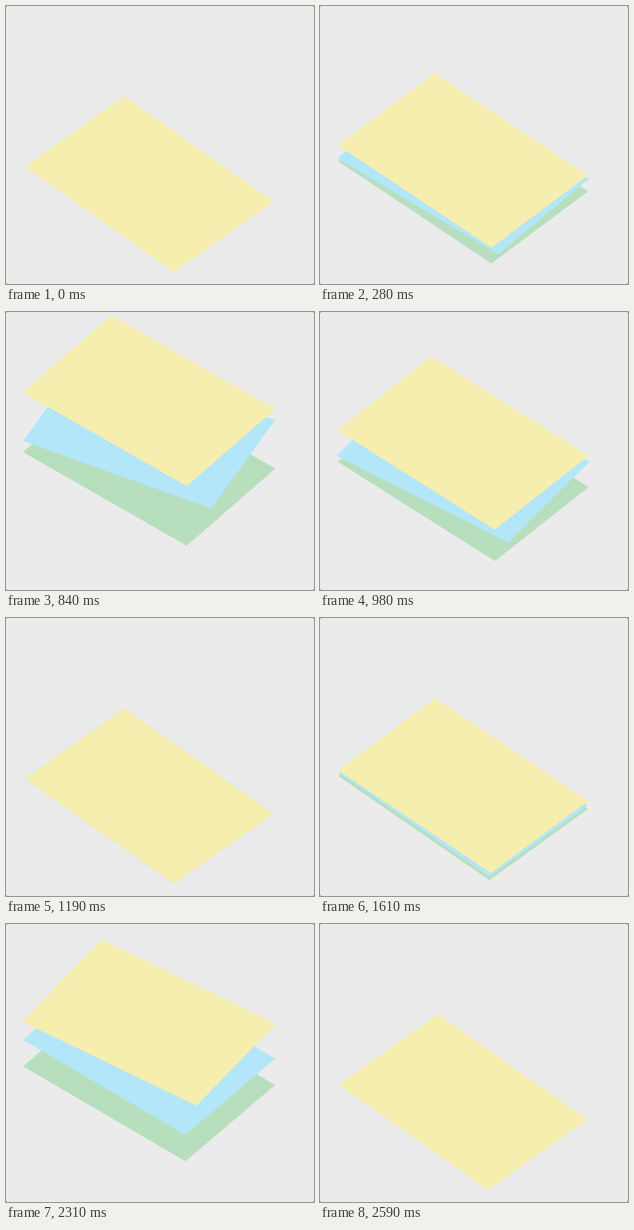
An HTML page with a canvas that plays this animation: 438 px wide and 396 px high, repeating every 3.29 s.

```html
<!DOCTYPE html>
<html lang="en">
<head>
<meta charset="utf-8">
<title>Stacked sheets</title>
<style>
  html, body { margin: 0; width: 100%; height: 100%; overflow: hidden; background: #ebebeb; }
  canvas { display: block; width: 438px; height: 396px; }
</style>
</head>
<body>
<canvas id="stage" width="438" height="396"></canvas>
<script>
const ctx = document.getElementById('stage').getContext('2d');
const WIDTH = 438, HEIGHT = 396;
const LOOP = 3290, TICK = 70, FADE = 300;
const CENTER = { x: 203.5, y: 253.7 };
const SHEET = { w: 300, h: 200 };
const TILT = Math.SQRT1_2; // cosine and sine of the 45 degree tilt
const LIFT = 60, TURN = 6;
const COLORS = ['#b7dfbd', '#b3e6f9', '#f6eeae']; // bottom to top

// Each spread opens and closes the stack; one sheet turns further.
const SPREADS = [
  { open: 224, close: 896, sheet: 1, turn: 18 },
  { open: 1576, close: 2277, sheet: 2, turn: 12 }
];

const bezier = (a, b, u) => 3 * a * u * (1 - u) ** 2 + 3 * b * u * u * (1 - u) + u ** 3;

// cubic-bezier(.25, .1, .25, 1)
function ease(x) {
  if (x <= 0) return 0;
  if (x >= 1) return 1;
  let lo = 0, hi = 1;
  for (let i = 0; i < 30; i++) {
    const mid = (lo + hi) / 2;
    if (bezier(0.25, 0.25, mid) < x) lo = mid; else hi = mid;
  }
  return bezier(0.1, 1, lo);
}

function drawSheet(color, lift, degrees) {
  const a = degrees * Math.PI / 180, c = Math.cos(a), s = Math.sin(a);
  ctx.save();
  ctx.transform(c, s * TILT, -s, c * TILT, CENTER.x, CENTER.y - lift * TILT);
  ctx.fillStyle = color;
  ctx.fillRect(-SHEET.w / 2, -SHEET.h / 2, SHEET.w, SHEET.h);
  ctx.restore();
}

function drawBackdrop() {
  ctx.fillStyle = '#555';
  ctx.fillRect(0, 0, WIDTH, HEIGHT);
  ctx.fillStyle = '#ebebeb';
  ctx.beginPath();
  ctx.roundRect(0, 0, WIDTH, HEIGHT, 2);
  ctx.fill();
}

function draw(time) {
  const t = Math.floor((time % LOOP) / TICK) * TICK;
  const spread = t < SPREADS[1].open ? SPREADS[0] : SPREADS[1];
  const amount = ease((t - spread.open) / FADE) - ease((t - spread.close) / FADE);

  drawBackdrop();
  if (amount <= 0) {
    drawSheet(COLORS[2], 0, 45);
    return;
  }
  COLORS.forEach((color, i) => {
    const turn = i === spread.sheet ? spread.turn : TURN;
    drawSheet(color, LIFT * (i + 1) * amount, 45 - turn * amount);
  });
}

const start = performance.now();
function tick() {
  draw(performance.now() - start);
  requestAnimationFrame(tick);
}
tick();
</script>
</body>
</html>
```
